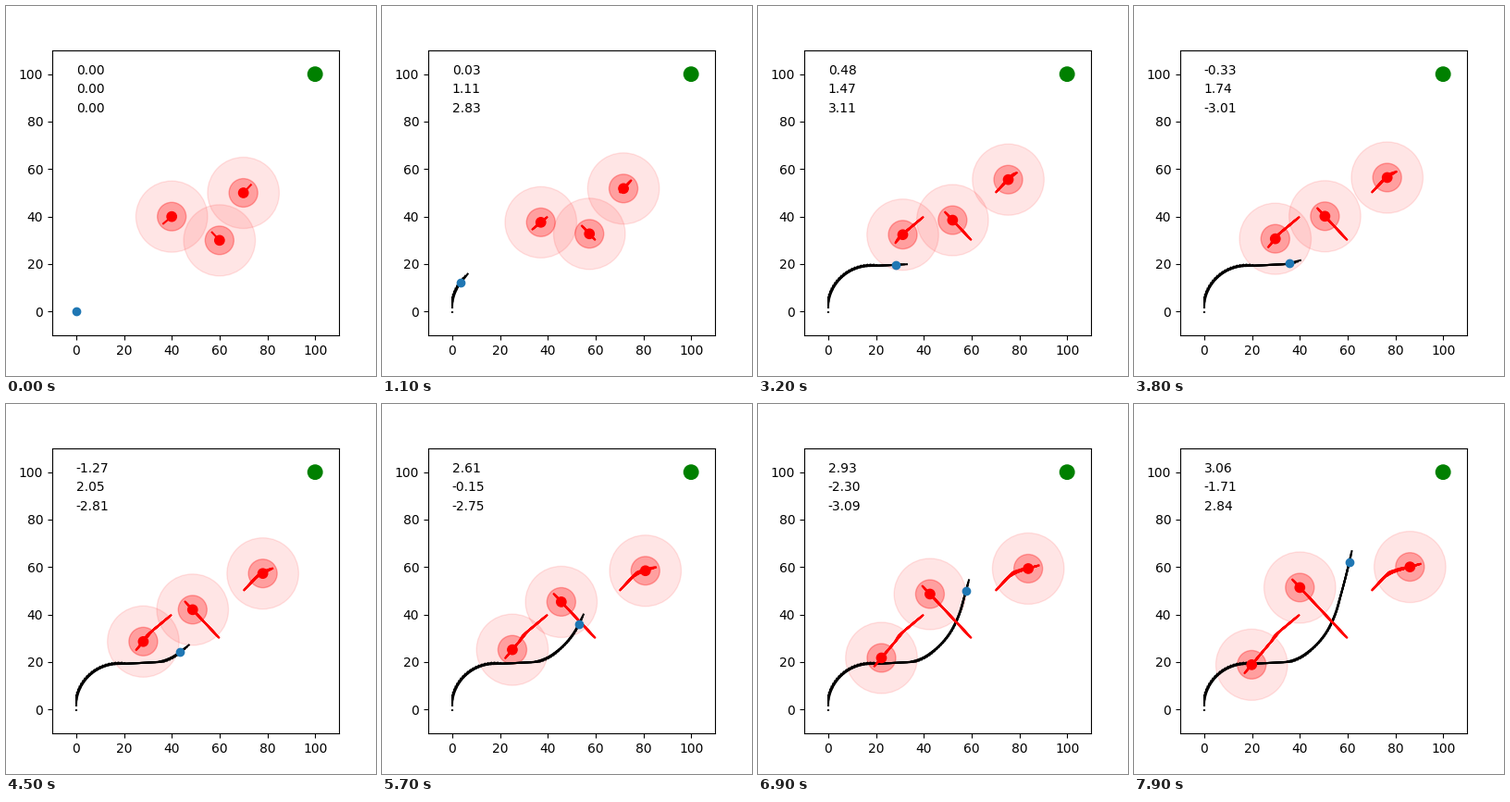
These frames come from a looping animation (400 px wide and 400 px high, 8 s). A matplotlib script:

```python
import numpy as np
import matplotlib.pyplot as plt
from matplotlib.animation import FuncAnimation
from matplotlib.collections import LineCollection
from matplotlib.patches import Circle

FRAMES, INTERVAL = 80, 100
ARROW = 5
STEPS = np.arange(FRAMES - 1)


class Mover:
    """Drives at a given speed along a heading that turns between key steps."""

    def __init__(self, start, speed, keys, degrees, color):
        angle = np.radians(np.interp(STEPS, keys, degrees))
        mid = (angle[1:] + angle[:-1]) / 2
        move = np.column_stack([np.cos(mid), np.sin(mid)])
        move *= np.broadcast_to(speed, STEPS.shape)[1:, None]
        self.pos = np.vstack([start, start + np.cumsum(move, axis=0)])
        self.aim = ARROW * np.column_stack([np.cos(angle), np.sin(angle)])
        self.trail = LineCollection([], colors=color, linewidths=1.5, zorder=2)

    def draw_trail(self, step):
        tail = self.pos[:step + 1]
        self.trail.set_segments(np.stack([tail, tail + self.aim[:step + 1]], axis=1))


robot = Mover((0, 0), np.where(STEPS <= 22, 1.3, 1.25),
              [1, 22, 34, 42, 54, 62, 78], [90, 2.5, 3, 33, 60, 73.5, 77], "black")
robot.aim[0] = 0, -0.6  # standing still: just a dot

obstacles = [
    Mover((40, 40), 0.375, [24, 32], [220, 230], "red"),
    Mover((60, 30), 0.375, [0], [133], "red"),
    Mover((70, 50), 0.25, [24, 34, 56, 78], [47, 35, 18, 16], "red"),
]

# Readouts in radians, unwrapped so they turn smoothly through +-pi
ANGLE_STEPS = [10, 31, 44, 56, 68, 78]
ANGLES = [
    [0.03, 0.48, -1.27, -3.67, -3.35, -3.22],
    [1.11, 1.47, 2.05, -0.15, -2.30, -1.71],
    [2.83, 3.11, 3.47, 3.53, 3.19, 2.84],
]

fig, ax = plt.subplots(figsize=(4, 4), dpi=100)
ax.set(xlim=(-10, 110), ylim=(-10, 110))
ax.add_patch(Circle((100, 100), 3, color="green"))

rings = []
for ob in obstacles:
    group = [Circle(ob.pos[0], radius, color="red", alpha=alpha, zorder=z)
             for radius, alpha, z in ((2, 1, 3), (6, 0.3, 1), (15, 0.1, 1))]
    for ring in group:
        ax.add_patch(ring)
    rings.append(group)

movers = [robot, *obstacles]
for mover in movers:
    ax.add_collection(mover.trail, autolim=False)

dot, = ax.plot([0], [0], "o", color="C0", zorder=4)
labels = [ax.text(0, y, "0.00") for y in (100, 92, 84)]


def wrap(a):
    return (a + np.pi) % (2 * np.pi) - np.pi


def update(frame):
    step = max(0, frame - 1)
    for mover in movers:
        mover.draw_trail(step)
    for ob, group in zip(obstacles, rings):
        for ring in group:
            ring.center = ob.pos[step]
    dot.set_data(robot.pos[step:step + 1].T)
    for label, row in zip(labels, ANGLES):
        value = wrap(np.interp(step, ANGLE_STEPS, row)) if step else 0
        label.set_text(f"{value:.2f}")
    return []


anim = FuncAnimation(fig, update, frames=FRAMES, interval=INTERVAL,
                     init_func=lambda: update(0), repeat=True, repeat_delay=0)
plt.show()
```
